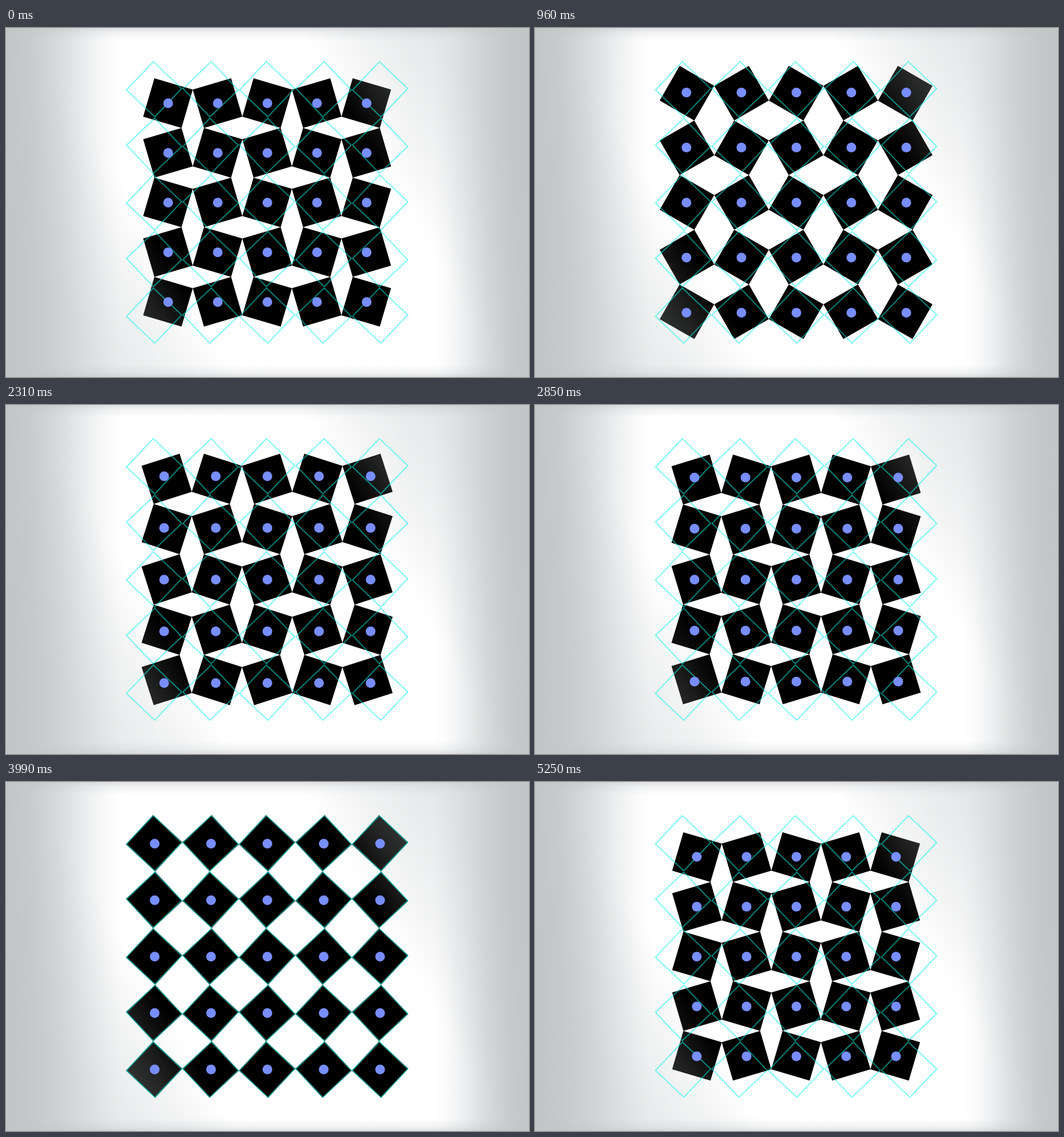
An HTML page with a canvas for the animation above (5.28 s loop, 917 px wide and 611 px high).

```html
<!DOCTYPE html>
<html lang="en">
<head>
<meta charset="utf-8">
<title>Rotating squares</title>
<style>
  html, body { margin: 0; width: 100%; height: 100%; overflow: hidden; background: #fff; }
  canvas { display: block; width: 917px; height: 611px; }
</style>
</head>
<body>
<canvas id="stage"></canvas>
<script>
const W = 917, H = 611, LOOP = 5280, STEP = 30;
const CX = 457.8, CY = 305.4, SIDE = 70.07, N = 5;
const FULL = SIDE * Math.SQRT2;          // pitch when the squares stand on a corner
const SHUT = 87;                         // pitch when the grid is tightest
const QUARTERS = [0, 1310, 2640, 3950, LOOP];
const RAD = Math.PI / 180;

// [time in ms, tilt in degrees away from standing on a corner]
const TILT = [
  [0, -28.7], [540, -24.8], [960, -15.1], [1080, -10.6], [1305, 0],
  [1620, 13.5], [1740, 17.5], [2160, 25.7], [2310, 27.3], [2640, 28.6],
  [3270, 23.0], [3780, 8.0], [3990, -2.1], [4320, -16.2], [4860, -26.6],
  [LOOP, -28.7]
];

const canvas = document.getElementById('stage');
const ctx = canvas.getContext('2d');
const ratio = window.devicePixelRatio || 1;
canvas.width = W * ratio;
canvas.height = H * ratio;

// Slope of the tilt curve at key i; flat where it turns.
function slope(i) {
  const a = TILT[i - 1], b = TILT[i], c = TILT[i + 1];
  if (!a || !c || b[0] === LOOP / 2) return 0;
  const h = b[0] - a[0], k = c[0] - b[0];
  return (k * (b[1] - a[1]) / h + h * (c[1] - b[1]) / k) / (h + k);
}

function tiltAt(t) {
  let i = 0;
  while (i < TILT.length - 2 && t >= TILT[i + 1][0]) i++;
  const [t0, v0] = TILT[i], [t1, v1] = TILT[i + 1];
  const d = t1 - t0, x = (t - t0) / d, y = 1 - x;
  return v0 * (1 + 2 * x) * y * y + slope(i) * d * x * y * y
       + v1 * (3 - 2 * x) * x * x - slope(i + 1) * d * x * x * y;
}

// The dots travel between the tight and the open grid with a nearly even speed.
function dotPitch(t) {
  let i = 0;
  while (i < 3 && t >= QUARTERS[i + 1]) i++;
  let x = (t - QUARTERS[i]) / (QUARTERS[i + 1] - QUARTERS[i]);
  if (i % 2) x = 1 - x;
  return SHUT + (FULL - SHUT) * (x + 0.22 * x * (1 - x));
}

function eachCell(pitch, draw) {
  for (let r = 0; r < N; r++) {
    for (let c = 0; c < N; c++) {
      draw(CX + (c - 2) * pitch, CY + (r - 2) * pitch, (r + c) % 2 ? -1 : 1);
    }
  }
}

function squares(g, pitch, side, tilt) {
  const half = side / Math.SQRT2;
  g.beginPath();
  eachCell(pitch, (x, y, sign) => {
    for (let k = 0; k < 4; k++) {
      const a = (sign * tilt + 90 * k) * RAD;
      g.lineTo.call(g, x, y); // replaced below by the first corner
    }
  });
}

function squarePath(x, y, side, tilt) {
  const r = side / Math.SQRT2;
  for (let k = 0; k < 4; k++) {
    const a = (tilt + 90 * k) * RAD;
    const px = x + r * Math.cos(a), py = y + r * Math.sin(a);
    if (k) ctx.lineTo(px, py); else ctx.moveTo(px, py);
  }
  ctx.closePath();
}

function squareGrid(pitch, side, tilt) {
  ctx.beginPath();
  eachCell(pitch, (x, y, sign) => squarePath(x, y, side, sign * tilt));
}

// Grey fade along a line; stops are [position, opacity].
function fade(x0, y0, x1, y1, stops) {
  const g = ctx.createLinearGradient(x0, y0, x1, y1);
  for (const [p, a] of stops) g.addColorStop(p, `rgba(192,196,197,${a})`);
  return g;
}

const SIDE_FADE = [[0, 0.96], [0.2, 0.88], [0.45, 0.62], [0.7, 0.27], [0.88, 0.07], [1, 0]];
const SLANT_FADE = [[0, 0], [0.1, 0.05], [0.35, 0.18], [0.65, 0.3], [1, 0.42]];
const RIM_FADE = [[0, 0.5], [0.35, 0.22], [1, 0]];

// Point on the slanted axis at offset u from the middle.
const slant = u => [W / 2 + u / 1.36, H / 2 - 0.6 * u / 1.36];

const shades = [
  fade(0, 0, 205, 0, SIDE_FADE),
  fade(W, 0, W - 165, 0, SIDE_FADE),
  fade(...slant(235), ...slant(480), SLANT_FADE),
  fade(...slant(-235), ...slant(-480), SLANT_FADE),
  fade(0, 0, 0, 22, RIM_FADE),
  fade(0, H, 0, H - 22, RIM_FADE)
];

function render(t) {
  const tilt = tiltAt(t);
  ctx.setTransform(ratio, 0, 0, ratio, 0, 0);
  ctx.fillStyle = '#fff';
  ctx.fillRect(0, 0, W, H);

  ctx.fillStyle = '#000';
  squareGrid(FULL * Math.cos(tilt * RAD), SIDE, tilt);
  ctx.fill();

  for (const shade of shades) {
    ctx.fillStyle = shade;
    ctx.fillRect(0, 0, W, H);
  }

  ctx.strokeStyle = 'rgba(0,248,232,0.53)';
  ctx.lineWidth = 2;
  squareGrid(FULL, 68.4, -1.5);
  ctx.stroke();

  ctx.fillStyle = '#788eff';
  eachCell(dotPitch(t), (x, y) => {
    ctx.beginPath();
    ctx.arc(x + 0.5, y + 0.3, 8.5, 0, 2 * Math.PI);
    ctx.fill();
  });
}

const start = performance.now();
function tick() {
  const t = (performance.now() - start) % LOOP;
  render(Math.floor(t / STEP) * STEP);
  requestAnimationFrame(tick);
}
tick();
</script>
</body>
</html>
```
